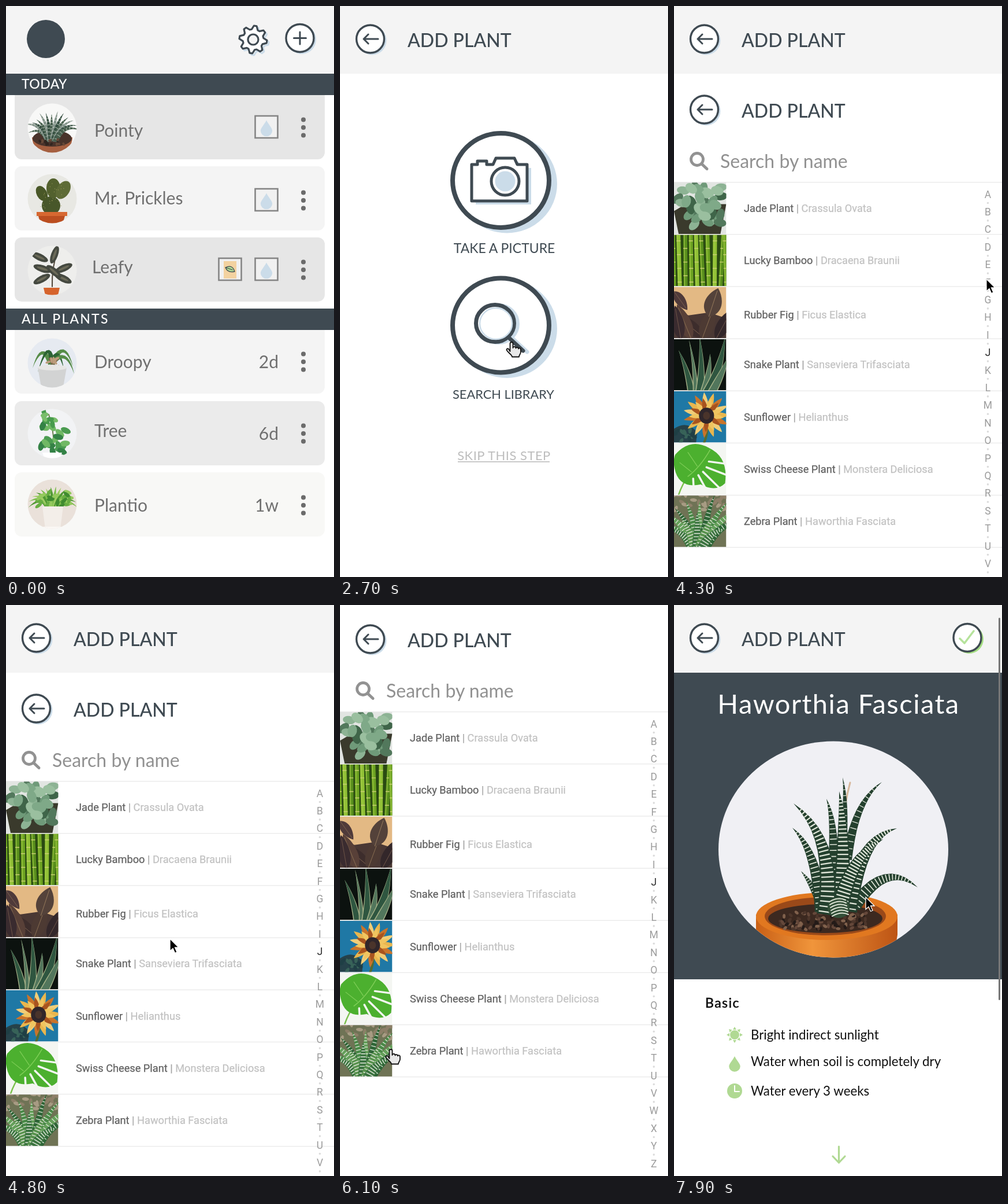
An HTML page that plays this animation: 568 by 987 pixels, repeating every 8 s.

```html
<!DOCTYPE html>
<html lang="en">
<head>
<meta charset="utf-8">
<title>Plant care app</title>
<style>
html, body { margin: 0; width: 100%; height: 100%; overflow: hidden; background: #fff; }
svg#stage { display: block; width: 100vw; height: 100vh; }
text { font-family: Lato, "Open Sans", sans-serif; white-space: pre; }
.list text { font-family: Roboto, "Liberation Sans", sans-serif; }
.list text.search { font-family: Lato, "Open Sans", sans-serif; }
</style>
</head>
<body>
<svg id="stage" viewBox="0 0 568 987" preserveAspectRatio="none"></svg>
<script>
const LOOP = 8000, INK = '#3f4a52', BLUE = '#cbdce9', GREEN = '#b0d993', HEAD = '#f4f4f4';

let seed = 7;
const rnd = () => (seed = seed * 16807 % 2147483647) / 2147483647;
const times = (n, f) => Array.from({ length: n }, (_, i) => f(i)).join('');
const pick = (list, i) => list[i % list.length];

// Drawing helpers
const text = (x, y, size, str, fill, extra = '') =>
  `<text x="${x}" y="${y}" font-size="${size}" fill="${fill}" ${extra}>${str}</text>`;
const rect = (x, y, w, h, fill, extra = '') =>
  `<rect x="${x}" y="${y}" width="${w}" height="${h}" fill="${fill}" ${extra}/>`;
const oval = (x, y, rx, ry, fill, turn = 0, extra = '') =>
  `<ellipse cx="${x}" cy="${y}" rx="${rx}" ry="${ry}" fill="${fill}" transform="rotate(${turn} ${x} ${y})" ${extra}/>`;
const line = (d, stroke, width, fill = 'none') =>
  `<path d="${d}" stroke="${stroke}" stroke-width="${width}" fill="${fill}" stroke-linecap="round" stroke-linejoin="round"/>`;
const shape = (d, fill) => `<path d="${d}" fill="${fill}"/>`;
const at = (x, y, body, extra = '') => `<g transform="translate(${x} ${y})" ${extra}>${body}</g>`;
const drop = (x, y, s, fill) =>
  at(x, y, shape(`M0 ${-s}C${s * .3} ${-s * .4} ${s * .75} 0 ${s * .75} ${s * .35}A${s * .75} ${s * .7} 0 0 1 ${-s * .75} ${s * .35}C${-s * .75} 0 ${-s * .3} ${-s * .4} 0 ${-s}Z`, fill));

// A tapered leaf along a quadratic curve, optionally with pale cross bands
function blade(x0, y0, cx, cy, x1, y1, w, fill, bands = 0) {
  const edge = (t, k) => {
    const u = 1 - t, dx = u * (cx - x0) + t * (x1 - cx), dy = u * (cy - y0) + t * (y1 - cy);
    const r = k * w * (1 - t ** 1.6) / Math.hypot(dx, dy);
    return (u * u * x0 + 2 * u * t * cx + t * t * x1 - dy * r).toFixed(1) + ' ' +
           (u * u * y0 + 2 * u * t * cy + t * t * y1 + dx * r).toFixed(1);
  };
  const side = k => Array.from({ length: 11 }, (_, i) => edge(i / 10, k));
  return shape('M' + [...side(1), ...side(-1).reverse()].join('L') + 'Z', fill) +
    (bands ? line(times(bands, i => {
      const t = (i + .5) / bands * .93;
      return `M${edge(t, .75)}L${edge(t, -.75)}`;
    }), '#dfe5d8', w * .14 + .2) : '');
}
const fan = (n, x, y, len, spread, w, fills, bands) => times(n, i => {
  const a = (i / (n - 1) * 2 - 1) * spread * Math.PI / 180, l = len * (.8 + .25 * rnd());
  return blade(x + a * 6, y, x + Math.sin(a) * l * .4, y - l * .6, x + Math.sin(a) * l, y - Math.cos(a) * l, w, pick(fills, i), bands);
});
const scatter = (n, x, y, sx, sy, rx, ry, fills) => times(n, i =>
  oval(x + (rnd() - .5) * sx, y + (rnd() - .5) * sy, rx, ry, pick(fills, i), rnd() * 180));
// A pointed leaf with a midrib
const leaf = (x, y, len, w, turn, fill, rib) => at(x, y, `<g transform="rotate(${turn})">` +
  shape(`M0 0C${len * .2} ${-w * 1.3} ${len * .7} ${-w} ${len} 0C${len * .7} ${w} ${len * .2} ${w * 1.3} 0 0Z`, fill) +
  line(`M0 0H${len * .9}`, rib, .9) + '</g>');
const rosette = (n, x, y, len, w, fills, turn = 0) =>
  times(n, i => leaf(x, y, len, w, i / n * 360 + turn, pick(fills, i), pick(fills, i)));
const bg = fill => rect(0, 0, 90, 90, fill);
const cup = (x, y, w, h, fill) => shape(`M${x - w} ${y}H${x + w}L${x + w * .75} ${y + h}H${x - w * .75}Z`, fill);

// Simplified plant photos in a 90 by 90 box
const photo = {
  aloe: () => bg('#cfd0cb') + rect(0, 28, 90, 26, '#6b4038') + rect(0, 50, 90, 40, '#35452f') +
    fan(7, 44, 84, 80, 85, 11, ['#3f6f48', '#5d8a5f', '#2f5636']) + fan(4, 44, 92, 66, 48, 12, ['#4c7b50', '#6d9a6c']),
  cactus: () => bg('#dedfda') + oval(70, 45, 13, 24, '#59623a', 12) + oval(14, 48, 17, 31, '#46502b', -6) +
    oval(53, 27, 23, 37, '#3f4a29', 8) + oval(39, 83, 31, 17, '#454e2c') +
    scatter(45, 40, 42, 65, 75, .7, .7, ['#8d7441', '#7f8754']),
  palm: () => bg('#c3c5c4') + times(15, i => blade(80 - i * 5, 88 - i * 5, 55 - i * 2, 55 - i * 3, 2 + i * 6, 63 - i * 4, 2, pick(['#597e64', '#79947f', '#3d624c'], i))) +
    times(10, i => blade(88, 90 - i * 4, 70, 45, 8 + i * 9, 4 + i * 2, 2.3, pick(['#4f735b', '#6f8f78'], i))),
  rose: () => bg('#d6d3dc') + rosette(10, 45, 45, 46, 9, ['#6a9d7d', '#3d7358']) +
    rosette(9, 45, 45, 34, 8, ['#90b694', '#4f8b6b'], 18) + rosette(7, 45, 45, 20, 6, ['#2f6a55', '#6da080']) + oval(45, 45, 4, 4, '#97b68d'),
  ivy: () => bg('#e3edc6') + times(26, i => leaf(rnd() * 90, 8 + rnd() * 70, 38, 11, 20 + rnd() * 130, pick(['#6fa62f', '#93c846', '#4f8a26', '#a9d35f'], i), '#c4e388')),
  fig: () => bg('#e6eae4') + line('M42 90Q45 48 40 0', '#4e7d42', 2) + [[40, 25, 150], [40, 22, 20], [42, 38, 175], [42, 40, 5], [42, 60, 140], [42, 62, 40], [43, 72, 160], [43, 72, 15]].map(([x, y, a], i) =>
    leaf(x, y, 46, 13, a, pick(['#4c8541', '#6ba45c', '#3a7035'], i), '#9cc48c')).join('') + leaf(40, 14, 40, 10, -30, '#5d9a50', '#9cc48c'),
  iron: () => bg('#f1f3ef') + fan(7, 42, 94, 88, 80, 9, ['#2d5a35', '#47794a', '#23482b']) + fan(4, 42, 94, 78, 38, 8, ['#3a6a40', '#5c8d5c']),
  jade: () => bg('#e2e5e2') + shape('M0 50L20 38H90L80 90H8Z', '#3a3a2c') +
    scatter(26, 46, 42, 80, 68, 11, 7, ['#52785c', '#6f9a79', '#8db394', '#3f6549']) + scatter(12, 48, 36, 60, 52, 11, 8, ['#7fa988', '#9abf9f']),
  bamboo: () => bg('#2a4a12') + times(10, i => {
    const x = i * 10 - 3, lean = rnd() * 9 - 4;
    return line(`M${x + 3} 90L${x + lean + 3} 0`, pick(['#6da321', '#90c035', '#588e1c'], i), 7) +
      line(`M${x + 1.5} 90L${x + lean + 1.5} 0`, '#a9cf4b', 1) +
      times(4, k => line(`M${x + lean * (1 - (k * 24 + i * 11 % 22) / 90)} ${k * 24 + i * 11 % 22}h6`, '#c9cf72', 1.5));
  }),
  rubber: () => bg('#e3b984') + shape('M0 40L25 50L60 45L90 55V90H0Z', '#4a3834') +
    leaf(50, 88, 62, 13, -140, '#3d2d2c', '#7d624f') + leaf(30, 92, 66, 13, -112, '#584038', '#8b7053') +
    leaf(48, 92, 60, 14, -70, '#4d3a33', '#8b7053') + leaf(60, 52, 52, 17, -72, '#54423a', '#967a5c') +
    leaf(72, 92, 60, 13, -62, '#33272a', '#705648') + leaf(12, 92, 60, 12, -100, '#3a2b2f', '#705648') + leaf(0, 8, 40, 10, 55, '#4f3a3a', '#7d624f'),
  snake: () => bg('#0c120f') + [[8, 20, 5], [26, 2, 3], [44, -6, 6], [62, 26, 5], [88, -4, 8], [92, 34, 6]].map(([x, y, w], i) =>
    blade(30 + i * 7, 94, x * .5 + 20 + i * 4, 55, x, y, w + 1.5, '#a9b48a') + blade(30 + i * 7, 94, x * .5 + 20 + i * 4, 55, x, y, w, pick(['#2f5640', '#52765c'], i))).join(''),
  sunflower: () => bg('#1f78a5') + shape('M0 66Q22 50 40 72L38 90H0Z', '#26424a') + scatter(12, 18, 73, 36, 32, 6, 3, ['#1f3f45', '#376258']) +
    line('M57 45Q60 70 52 90', '#536c32', 4) + rosette(15, 56, 42, 40, 6, ['#e9b64e', '#c9742b', '#f0cd78']) +
    rosette(13, 56, 42, 30, 5, ['#f0c560', '#a8541f'], 9) + oval(56, 43, 13, 14, '#30262a') + oval(56, 43, 6, 7, '#4a342b'),
  monstera: () => bg('#f4f6f2') + line('M8 90Q14 72 24 58', '#7cc04e', 2.5) +
    shape('M2 20Q28-10 60 8Q94 24 88 70Q72 86 46 72Q8 80 1 44Q-2 30 2 20Z', '#4cb02f') + line('M24 58Q45 42 62 12', '#7fce57', 1.5) +
    line('M90 36L60 32M92 56L56 42M80 80L50 50M56 82L42 56M34 80L33 62', '#f4f6f2', 3.5) + line('M30 50L10 34M40 40L24 16', '#7fce57', 1.2),
  zebra: () => bg('#6f7355') + scatter(26, 45, 12, 90, 30, 6, 3, ['#8d7f68', '#a79b83']) +
    fan(9, 44, 100, 100, 58, 8, ['#4a8a48', '#64a05a', '#2f6637'], 14) + fan(5, 40, 100, 76, 50, 9, ['#3b7440', '#59934f'], 12)
};

const avatar = {
  pointy: () => bg('#f8f8f7') + shape('M10 61H80Q79 89 45 89Q12 89 10 61Z', '#a55f40') + oval(45, 63, 34, 14, '#49332b') +
    fan(13, 44, 68, 54, 70, 4, ['#48604f', '#83938a', '#354f41'], 8) + scatter(14, 45, 69, 48, 9, 3, 2, ['#31251f', '#674837']),
  prickles: () => bg('#e8e8e3') + oval(43, 57, 16, 16, '#48572a') + oval(47, 27, 12, 17, '#53612e') +
    oval(27, 36, 9, 14, '#495727', -28) + oval(64, 30, 11, 17, '#5e6b36', 32) + scatter(28, 45, 40, 40, 45, .6, .6, ['#a4a15f']) +
    rect(18, 68, 53, 7, '#d76831') + cup(44, 75, 23, 20, '#bb4e20'),
  leafy: () => bg('#eeeeec') + line('M45 73Q44 40 55 8', '#4e4437', 2) +
    [[23, 22, 25], [49, 18, -70], [28, 42, 18], [65, 41, -24], [27, 60, -28], [64, 59, 26], [48, 47, 40]].map(([x, y, a]) => oval(x, y, 16, 6, '#454940', a) + oval(x, y, 10, 2, '#6c6b59', a)).join('') +
    cup(44, 75, 14, 15, '#d6642d'),
  droopy: () => bg('#e6eaf1') + [[42, 47, 28, 5, 11, 54], [45, 46, 40, -2, 20, 61], [45, 46, 65, 0, 81, 51], [43, 48, 55, 10, 65, 55], [43, 48, 69, 14, 83, 64]].map((p, i) => blade(...p, 4, pick(['#568c48', '#2d6435'], i))).join('') +
    scatter(14, 44, 45, 22, 16, 5, 2, ['#80634c', '#bd9c7b']) + cup(45, 53, 25, 35, '#d2d3d3') + oval(45, 53, 25, 5, '#e7e7e5'),
  tree: () => bg('#f2f3f5') + line('M45 83Q52 53 39 12', '#69804e', 2) + scatter(18, 48, 54, 46, 46, 9, 5, ['#4b9c51', '#70b864', '#348246']) +
    scatter(8, 40, 21, 20, 30, 7, 4, ['#79bd6a', '#489b4d']) + cup(45, 78, 17, 12, '#fff'),
  plantio: () => bg('#eae1da') + fan(14, 47, 54, 43, 86, 4, ['#4f9832', '#7cbc4c', '#a0cc65']) +
    scatter(22, 46, 37, 62, 25, 7, 3, ['#68ad42', '#408b30', '#94c95d']) + cup(46, 49, 18, 35, '#f3eee9') + rect(0, 84, 90, 6, '#faf7f4')
};

// Shared interface parts
const roundButton = (x, y, shade, body) =>
  oval(x + 3, y + 2.5, 25, 25, shade) + oval(x, y, 24, 24, '#fff', 0, `stroke="${INK}" stroke-width="3.4"`) + body;
const titleBar = () => roundButton(52.5, 57, BLUE, line('M66 57H41M49 49L41 57L49 65', INK, 3)) +
  text(117, 71, 32, 'ADD PLANT', INK, 'font-weight="500"');
const grayHeader = rect(0, 0, 568, 117, HEAD);
const scrollbar = h => rect(562, 22, 3, h, '#777', 'rx="1.5"');

function home() {
  const cards = [
    ['Pointy', 'pointy', 140, 265, '#e6e6e6', 153, 226, 211, 210],
    ['Mr. Prickles', 'prickles', 277, 388, '#f4f4f4', 153, 343, 333, 336],
    ['Leafy', 'leafy', 400, 511, '#e6e6e6', 149, 462, 457, 456],
    ['Droopy', 'droopy', 545, 670, '#f4f4f4', 153, 626, 617, 615, '2d'],
    ['Tree', 'tree', 683, 794, '#ebebeb', 153, 745, 739, 739, '6d'],
    ['Plantio', 'plantio', 806, 917, '#f8f8f6', 153, 874, 861, 863, '1w']
  ];
  const box = (x, y) => rect(x, y, 39, 38, '#f1f1f1', 'stroke="#858585" stroke-width="2.6"');
  const bar = (y, str, gap) => rect(0, y, 568, 37, INK) + text(27, y + 26, 23, str, '#fff', `letter-spacing="${gap}" font-weight="500"`);
  const gear = 'M' + Array.from({ length: 32 }, (_, i) => {
    const r = i % 4 < 2 ? 24 : 18, a = (i + .3) * Math.PI / 16;
    return `${(428 + r * Math.cos(a)).toFixed(1)} ${(58 + r * Math.sin(a)).toFixed(1)}`;
  }).join('L') + 'Z';
  return cards.map(([name, pic, top, end, fill, x, base, picY, dotY, due]) =>
    rect(15, top, 537, end - top, fill, 'rx="12"') +
    at(80, picY, at(-45, -45, avatar[pic]()), 'clip-path="url(#disc)"') +
    text(x, base, 30, name, '#707070') +
    (due ? text(472, dotY + 11, 30, due, '#707070', 'text-anchor="end"')
         : box(431.5, dotY - 20) + drop(451, dotY + 1, 13.5, BLUE)) +
    times(3, i => oval(515, dotY + (i - 1) * 13.5, 4, 4, '#6b6b6b'))).join('') +
    box(368.5, 436) + rect(377, 441, 22, 30, '#f3d2a0') + at(388, 455, line('M-8-3Q4-9 8 4Q-4 7-8-3L4 1', INK, 1.3, GREEN)) +
    bar(117, 'TODAY', .4) + bar(523, 'ALL PLANTS', 2.2) + grayHeader +
    oval(69, 57, 33, 33, INK) +
    at(3, 3, line(gear, BLUE, 3)) + line(gear, INK, 3.2, '#fff') + oval(428, 58, 9, 9, HEAD, 0, `stroke="${INK}" stroke-width="3.2"`) +
    roundButton(509, 55.5, BLUE, line('M509 45V66M498.5 55.5H519.5', INK, 3));
}

function choose() {
  const ring = y => oval(289, y + 6, 87, 85, BLUE) + oval(278.5, y, 83.5, 81.5, '#fff', 0, `stroke="${INK}" stroke-width="8"`);
  const center = 'text-anchor="middle"';
  const body = 'M228 274H238V268H254V274H265L270 263H302L307 274H324V337H228Z';
  return grayHeader + titleBar() + ring(301.5) + ring(552) +
    at(7, 6, shape(body, BLUE)) + line(body, INK, 5, '#fff') +
    oval(286, 303, 24, 24, '#fff', 0, `stroke="${INK}" stroke-width="5"`) + oval(286, 303, 17.5, 17.5, BLUE) +
    at(6, 1, oval(268.5, 548.5, 33, 32, 'none', 0, `stroke="${BLUE}" stroke-width="7"`) + line('M292 573L318 597', BLUE, 7)) +
    oval(268.5, 548.5, 33, 32, '#fff', 0, `stroke="${INK}" stroke-width="7"`) +
    oval(270, 549, 28, 27, 'none', 0, `stroke="${BLUE}" stroke-width="2.5"`) + line('M292 573L317 596', INK, 7) +
    text(284.5, 427, 23, 'TAKE A PICTURE', INK, center) + text(283, 679, 21.8, 'SEARCH LIBRARY', INK, center) +
    text(284, 785, 22, 'SKIP THIS STEP', '#bdbdbd', center + ' letter-spacing=".5"') + rect(204, 787, 159, 1.6, '#bdbdbd');
}

const plants = [
  ['aloe', 'Aloe Vera'], ['cactus', 'Cactus', 'Cactaceae'], ['palm', 'Cat Palm', 'Chamaedorea Elegans'],
  ['rose', 'Copper Rose', 'Echeveria Multicaulis'], ['ivy', "Devil's Ivy", 'Epipremnum Aureum'],
  ['fig', 'Fiddle-leaf Fig', 'Ficus Lyrata'], ['iron', 'Iron Plant', 'Aspidistra Elatior'],
  ['jade', 'Jade Plant', 'Crassula Ovata'], ['bamboo', 'Lucky Bamboo', 'Dracaena Braunii'],
  ['rubber', 'Rubber Fig', 'Ficus Elastica'], ['snake', 'Snake Plant', 'Sanseviera Trifasciata'],
  ['sunflower', 'Sunflower', 'Helianthus'], ['monstera', 'Swiss Cheese Plant', 'Monstera Deliciosa'],
  ['zebra', 'Zebra Plant', 'Haworthia Fasciata']
];

function library(first, count, active) {
  const tint = (str, c) => `<tspan fill="${c}" stroke="${c}">${str}</tspan>`;
  const rows = plants.slice(first, first + count).map(([pic, name, latin], i) => {
    const y = 182 + i * 90.15, divider = first + i < 7 ? '#606060' : '#a4a4a4';
    return `<svg y="${y + 1}" width="90.5" height="89" viewBox="0 0 90 90" preserveAspectRatio="none">${photo[pic]()}</svg>` +
      rect(0, y, 568, 1.3, '#e9e9e9') +
      text(121, y + 52 + (i === 2 ? 4 : 0), 18.2, name + (latin ? tint(' | ', divider) + tint(latin, '#c1c1c1') : ''),
        '#606060', 'stroke="#606060" stroke-width=".25"');
  }).join('');
  const index = times(26, i => {
    const c = String.fromCharCode(65 + i), y = 203 + i * 30.4;
    return text(543.5, y + 6.5, 17.5, c, c === active ? '#2a2a2a' : '#9b9b9b', 'text-anchor="middle"') +
      (i < 25 ? oval(543.5, y + 15.5, 1.8, 1.8, '#dcdcdc') : '');
  });
  return titleBar() + `<g class="list">` +
    oval(40, 143, 10.5, 10.5, 'none', 0, 'stroke="#929292" stroke-width="4.8"') + line('M48.5 151.5L57 159.5', '#929292', 5) +
    text(80, 158, 32, 'Search by name', '#919191', 'class="search"') +
    rows + rect(0, 182 + count * 90.15, 568, 1.3, '#e9e9e9') + index + '</g>';
}

function detail() {
  const blades = [
    [300, 440, 312, 340, 360, 306, 8], [287, 460, 302, 350, 292, 298, 7], [274, 500, 282, 380, 264, 335, 10],
    [258, 525, 242, 485, 220, 460, 8], [255, 530, 248, 425, 205, 385, 11], [312, 522, 365, 440, 422, 488, 11],
    [303, 530, 320, 400, 386, 386, 14], [288, 528, 298, 400, 286, 322, 15], [262, 535, 282, 405, 207, 343, 15],
    [285, 535, 305, 430, 362, 405, 15]
  ];
  const sun = oval(105, 743, 8, 8, GREEN) + times(8, i => `<path d="M105 729l3 5h-6z" fill="${GREEN}" transform="rotate(${i * 45} 105 743)"/>`);
  const notes = [['Bright indirect sunlight', 751], ['Water when soil is completely dry', 797], ['Water every 3 weeks', 848]];
  return grayHeader + titleBar() +
    roundButton(508, 56.5, '#a5de83', line('M495 58L503 66L519 45', '#b6e39c', 3.5)) +
    rect(0, 117, 568, 530, INK) +
    text(285, 188, 47, 'Haworthia Fasciata', '#fff', 'text-anchor="middle" letter-spacing="1.5"') +
    `<g clip-path="url(#portrait)">` + rect(70, 230, 420, 390, '#f0f0f4') +
    shape('M142 535V570Q165 610 190 640H375L387 570V535Z', 'url(#clay)') + oval(264.5, 538, 122.5, 41, '#e17820') +
    oval(262, 538, 105, 33, '#9a4919') + oval(262, 542, 99, 25, '#3c2920') +
    scatter(100, 260, 546, 150, 30, 4, 2.5, ['#241b18', '#65483a', '#4d362b', '#80614c']) +
    line('M297 345Q300 325 305 307', '#d7b89c', 3) +
    blades.map(b => blade(...b, '#24402e', Math.round(b[6] * 1.7))).join('') +
    oval(285, 523, 19, 18, '#335039') + times(6, i => line(`M${269 + i} ${513 + i * 5}q15-9 28-3`, '#dce3d5', 2)) + '</g>' +
    text(54, 696, 23, 'Basic', '#111', 'letter-spacing="1.4" font-weight="500" stroke="#111" stroke-width=".4"') +
    notes.map(([str, y]) => text(133, y, 22.3, str, '#111')).join('') +
    sun + drop(105, 793, 13, GREEN) + oval(105, 840, 13, 13, GREEN) + line('M105 831V841H113', '#fff', 2) +
    line('M285.5 936V963M275 953L285.5 964L296 953', GREEN, 3.2) + scrollbar(661);
}

const scenes = [
  [0, home()],
  [1200, choose()],
  [2900, grayHeader + library(0, 9, 'A') + scrollbar(645)],
  [4300, `<g id="scroller">${grayHeader + titleBar() + at(0, 122, library(7, 7, 'J'))}</g>`],
  [6700, detail()]
];
const stage = document.getElementById('stage');
stage.innerHTML = `<defs><clipPath id="disc"><circle r="42.5"/></clipPath>
  <clipPath id="portrait"><ellipse cx="276" cy="422.5" rx="199" ry="187"/></clipPath>
  <linearGradient id="clay"><stop stop-color="#c96016"/><stop offset=".4" stop-color="#f0953b"/><stop offset="1" stop-color="#bd5414"/></linearGradient></defs>` +
  scenes.map(([, body]) => `<g class="scene">${body}</g>`).join('') +
  `<g id="cursor"><path id="arrow" d="M0 0V21L5 16.5L8.5 24.5L12 23L8.5 15H15Z" fill="#000" stroke="#fff" stroke-width="1.3"/>
  <path id="hand" d="M-2.5 16V2.5a2.5 2.5 0 0 1 5 0V10c0-3 5-3 5 .5c0-2 4.5-2 4.5 1c0-2 4-1.5 4 1.5V17c0 4-3 5-3 8.5H1C1 22-4 20-8 14.5c-1.5-3 1.5-4 3-2.5z" fill="#e8e8e8" stroke="#111" stroke-width="1.8" stroke-linejoin="round"/></g>`;

const el = id => document.getElementById(id);
const views = stage.querySelectorAll('.scene');
const path = [[400, 575, 180], [900, 507, 56], [1200, 507, 56], [1350, 505, 72], [1900, 505, 72], [2600, 297, 581], [3700, 297, 581],
  [4150, 541, 472], [4350, 541, 472], [4750, 284, 577], [5500, 284, 577], [6050, 88, 768], [7250, 88, 768], [7800, 332, 505]];
const handTimes = [[800, 1250], [2450, 4300], [5950, 6700]];
const ease = (t, a, b) => {
  const k = Math.min(1, Math.max(0, (t - a) / (b - a)));
  return k * k * (3 - 2 * k);
};
const show = (node, on) => node.setAttribute('display', on ? 'inline' : 'none');

function draw(t) {
  const now = scenes.findLastIndex(([start]) => t >= start);
  views.forEach((view, i) => show(view, i === now));
  el('scroller').setAttribute('transform', `translate(0 ${-120 * ease(t, 4900, 5200)})`);

  let [, x, y] = path[0];
  for (let i = 1; i < path.length; i++) {
    const k = ease(t, path[i - 1][0], path[i][0]);
    x += (path[i][1] - path[i - 1][1]) * k;
    y += (path[i][2] - path[i - 1][2]) * k;
  }
  const hand = handTimes.some(([a, b]) => t >= a && t < b);
  show(el('cursor'), t >= path[0][0]);
  show(el('hand'), hand);
  show(el('arrow'), !hand);
  el('cursor').setAttribute('transform', `translate(${x} ${y})`);
}

const begin = performance.now();
function tick() {
  draw((performance.now() - begin) % LOOP);
  requestAnimationFrame(tick);
}
tick();
</script>
</body>
</html>
```
